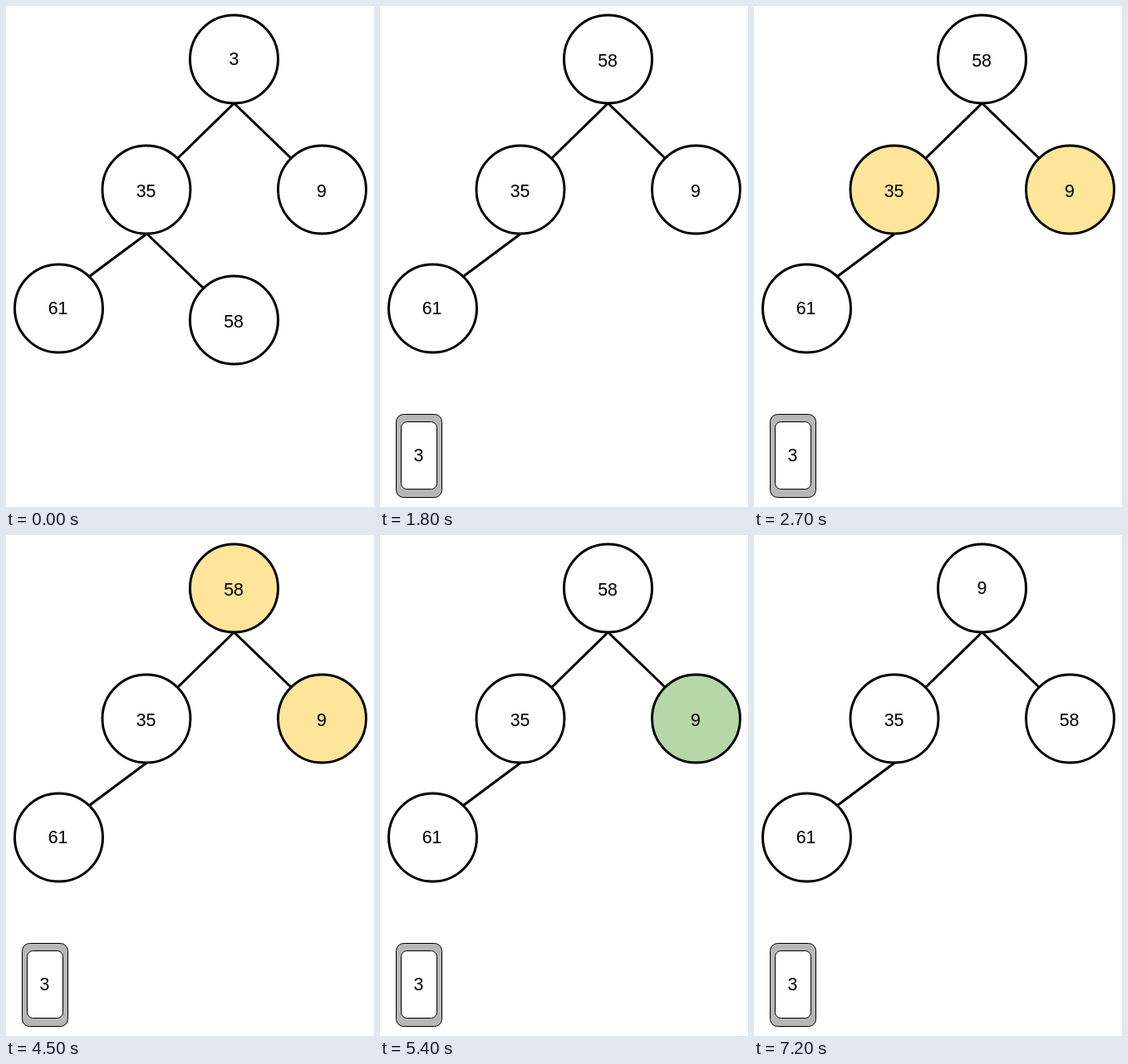
Animation, 443 px wide and 603 px high, one loop 8000 ms. Source, as an HTML page:

```html
<!DOCTYPE html>
<html lang="en">
<head>
<meta charset="utf-8">
<title>Heap: remove the minimum</title>
<style>
  html, body { margin: 0; height: 100%; overflow: hidden; background: #fff; }
  svg { display: block; }
  text { font: 21.33px "Liberation Sans", Arial, sans-serif; text-anchor: middle; }
</style>
</head>
<body>
<svg id="stage" width="443" height="603" viewBox="0 0 443 603"></svg>
<script>
const YELLOW = '#ffe599', GREEN = '#b6d7a8';
const STEP = 900, LOOP = 8000;
const stage = document.getElementById('stage');

const line = (x1, y1, x2, y2) =>
  `<path d="M${x1} ${y1}L${x2} ${y2}" stroke="#000" stroke-width="3"/>`;

const label = (x, baseline, value) => `<text x="${x}" y="${baseline}">${value}</text>`;

const node = (x, y, value, baseline, fill = '#fff', textX = x) =>
  `<circle cx="${x}" cy="${y}" r="53" fill="${fill}" stroke="#000" stroke-width="3"/>` +
  label(textX, baseline, value);

const box = (x, y, w, h, r, fill) =>
  `<rect x="${x}" y="${y}" width="${w}" height="${h}" rx="${r}" fill="${fill}" stroke="#000"/>`;

const card = box(19.5, 491.5, 55, 100, 9, '#b7b7b7') +
  box(25.5, 500.5, 43, 81, 7, '#fff') + label(46.5, 548, 3);

const swapArrow =
  '<path d="M340 89C378 89 398 110 398 157" fill="none" stroke="#000" stroke-width="3"/>' +
  '<path d="M330 89l13-6v12zM398 168l-6-13h12z"/>';

function draw(step) {
  const popped = step >= 1, moved = step >= 2, swapped = step === 8;
  const comparingRoot = step === 5;
  const leftFill = step === 3 ? YELLOW : '#fff';
  const rightFill = step === 3 || comparingRoot ? YELLOW
    : step === 4 || step === 6 ? GREEN : '#fff';

  let svg = line(274.5, 117, 207, 183) + line(274.5, 117, 343, 183) +
    line(169.5, 274, 101, 325);
  if (!moved) svg += line(169.5, 274, 237, 339) + node(274.5, 378, 58, 387, '#fff', 274);

  if (!popped) svg += node(274.5, 64, 3, 71);
  else if (swapped) svg += node(274.5, 64, 9, 71);
  else if (moved) svg += node(274.5, 64, 58, 73, comparingRoot ? YELLOW : '#fff', 274);

  svg += node(169, 221, 35, 230, leftFill, 168.5) + node(63.5, 364, 61, 371, '#fff', 62.5);
  svg += swapped ? node(380.5, 221, 58, 230, '#fff', 379.5)
    : node(380.5, 221, 9, 230, rightFill, 380);
  if (popped) svg += card;
  if (step === 7) svg += swapArrow;
  stage.innerHTML = svg;
}

let shown = -1;
function tick() {
  const step = Math.floor(performance.now() % LOOP / STEP);
  if (step !== shown) draw(shown = step);
  requestAnimationFrame(tick);
}
tick();
</script>
</body>
</html>
```
